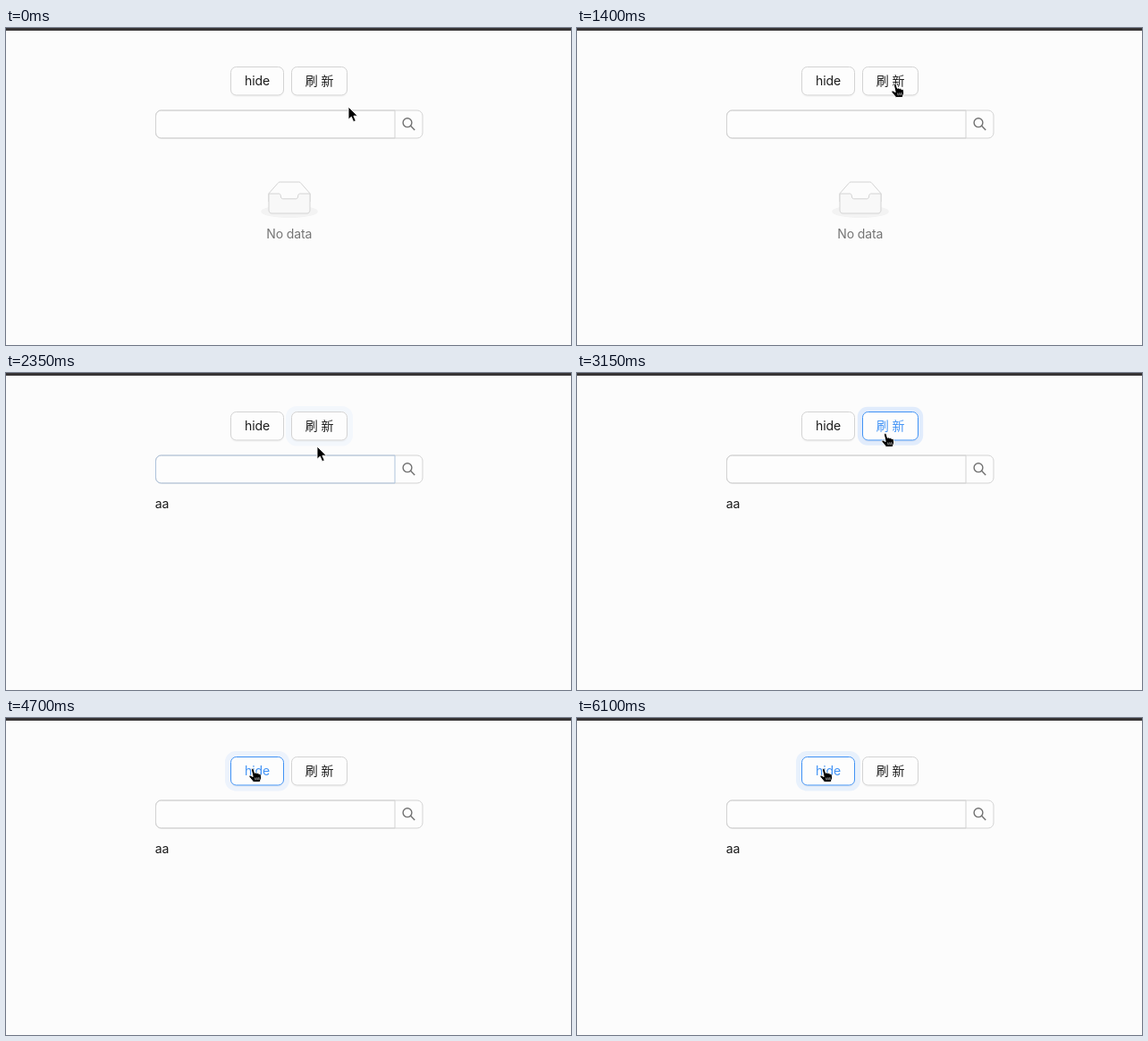
An HTML page for the animation above (6.3 s loop, 632x354 px).

```html
<!DOCTYPE html>
<html lang="en">
<head>
<meta charset="utf-8">
<title>Hide and refresh</title>
<style>
  html, body { margin: 0; width: 100%; height: 100%; overflow: hidden; background: #fcfcfc; }
  svg { display: block; width: 632px; height: 354px; }
  text { font: 14px Inter, "Noto Sans CJK SC", "Noto Sans CJK", sans-serif; letter-spacing: -.12px; fill: #1c1c1c; }
  .box { fill: #fdfdfd; stroke: #d3d3d3; }
  .shade { fill: #000; opacity: .025; }
  .wave { fill: none; stroke: #1677ff; }
  .line { fill: none; stroke: #d3d3d3; }
</style>
</head>
<body>
<svg viewBox="0 0 632 354">
  <rect width="632" height="354" fill="#fcfcfc"/>
  <rect width="632" height="3" fill="#373435"/>

  <g id="hide">
    <rect class="wave"/>
    <rect class="shade" x="251" y="45" width="60" height="32" rx="6"/>
    <rect class="box" x="251.5" y="43.5" width="59" height="31.5" rx="6"/>
    <text x="281" y="64" text-anchor="middle">hide</text>
  </g>
  <g id="refresh">
    <rect class="wave"/>
    <rect class="shade" x="319" y="45" width="63" height="32" rx="6"/>
    <rect class="box" x="319.5" y="43.5" width="62" height="31.5" rx="6"/>
    <text x="350.5" y="64" text-anchor="middle">刷 新</text>
  </g>

  <g id="panel">
    <rect class="box" x="167.5" y="92" width="298.5" height="31" rx="6"/>
    <path id="field" class="line" d="M435 92H173.500a6 6 0 0 0-6 6v19a6 6 0 0 0 6 6H435z"/>
    <g fill="none" stroke="#707070" stroke-width="1.4">
      <circle cx="449" cy="105.700" r="4.900"/>
      <path d="M452.600 109.300L457.200 113.900"/>
    </g>
    <g id="empty">
      <g transform="translate(285 172)">
        <ellipse cx="32" cy="33" rx="32" ry="7" fill="#f3f3f3"/>
        <path class="line" style="fill:#fcfcfc" d="M55 12.760L44.850 1.260C44.370.47 43.660 0 42.910 0H21.090c-.75 0-1.460.47-1.950 1.260L9 12.760V22h46z"/>
        <path class="line" style="fill:#f8f8f8" d="M41.600 15.900c0-1.600 1-2.900 2.200-2.900H55v18.100c0 2.100-1.300 3.900-2.950 3.900h-40.100C10.300 35 9 33.250 9 31.100V13h11.200c1.200 0 2.200 1.300 2.200 2.900s1 2.900 2.200 2.900h14.800c1.200 0 2.200-1.300 2.200-2.900z"/>
      </g>
      <text x="316.700" y="235" text-anchor="middle" style="fill:#757575">No data</text>
    </g>
    <text id="item" x="166.700" y="151">aa</text>
  </g>

  <g id="cursor">
    <path id="arrow" d="M0 0V14.200L3.300 11.200L5.700 16.700L8.300 15.600L5.900 10.200H10.400Z" fill="#000" stroke="#fff" stroke-width=".9"/>
    <g id="hand" stroke="#fff" stroke-width=".9" stroke-linejoin="round">
      <path d="M-1.500 1C-1.800-.6.600-1 1.100.5L2.300 4.400C3.200 3.600 4.400 4 4.700 4.900C5.600 4.300 6.700 4.700 7 5.600C8.200 5.100 9.200 5.800 9.300 7L9.600 10L8 14.500H.8L-3.900 8.800C-4.700 7.500-3.200 6.400-2 7.400L.2 8.600Z"/>
      <path d="M2.700 9.600L3.200 12.400M4.800 9.400L5.200 12.200M6.900 9.200L7 12" fill="none" stroke-width=".7"/>
    </g>
  </g>
</svg>
<script>
const LOOP = 6300, STEP = 50, FADE = 200, WAVE = 2000;
const $ = id => document.getElementById(id);
const clamp = v => Math.min(1, Math.max(0, v));
const easeOutCirc = p => Math.sqrt(1 - (1 - p) ** 2);
const within = (t, spans) => spans.some(([a, b]) => t >= a && t < b);

// time, x, y of the pointer tip
const path = [
  [0, 383, 88], [650, 370, 87], [1100, 356, 82], [1300, 357, 80],
  [1400, 356, 63], [1900, 356, 63], [2000, 353, 78], [2150, 350, 132],
  [2250, 349, 112], [2350, 348, 82], [2650, 344, 83], [2800, 277, 81],
  [2880, 300, 81], [2950, 345, 68], [3300, 345, 68], [3400, 316, 72],
  [3600, 276, 57], [LOOP, 276, 57]
];
const handSpans = [[1400, 1950], [2950, 3350], [3450, LOOP]];
const hiddenSpans = [[3950, 4200], [4750, 5050], [5350, 5750]];
const buttons = [
  { id: "hide", x: 251, w: 60, hover: [[3450, LOOP]], clicks: [3910, 4150, 4710, 5000, 5310, 5720] },
  { id: "refresh", x: 319, w: 63, hover: [[1400, 1950], [2920, 3350]], clicks: [1500, 2950] }
];
const fieldHover = [[2030, 2120], [2200, 2300]];
const loadedAt = 1750;

function pointAt(t) {
  const i = path.findIndex(k => k[0] > t);
  const [a, b] = [path[i - 1], path[i]];
  const p = (t - a[0]) / (b[0] - a[0]);
  return [1, 2].map(n => a[n] + (b[n] - a[n]) * p);
}

// 0 to 1: fades in at a span's start and out after its end
function glow(t, spans) {
  return Math.max(...spans.map(([a, b]) =>
    Math.min(clamp((t - a) / FADE), clamp((b - a) / FADE) - clamp((t - b) / FADE))), 0);
}

function mix(from, to, p) {
  return `rgb(${from.map((v, i) => Math.round(v + (to[i] - v) * p))})`;
}
const grey = [211, 211, 211], ink = [28, 28, 28], blue = [64, 146, 245];

function drawWave(el, b, t) {
  const start = Math.max(...b.clicks.filter(c => c <= t), -WAVE);
  const age = t - start;
  const s = 6 * easeOutCirc(clamp(age / 400));
  const attrs = {
    x: b.x - s / 2, y: 43 - s / 2, width: b.w + s, height: 32.5 + s,
    rx: 6 + s / 2, "stroke-width": s,
    opacity: 0.2 * (1 - easeOutCirc(clamp(age / WAVE)))
  };
  for (const name in attrs) el.setAttribute(name, attrs[name]);
}

function show(id, on) {
  $(id).style.display = on ? "" : "none";
}

function render(t) {
  for (const b of buttons) {
    const g = $(b.id), p = glow(t, b.hover);
    g.querySelector(".box").style.stroke = mix(grey, blue, p);
    g.querySelector("text").style.fill = mix(ink, blue, p);
    drawWave(g.querySelector(".wave"), b, t);
  }
  $("field").style.stroke = mix(grey, blue, glow(t, fieldHover));
  show("panel", !within(t, hiddenSpans));
  show("empty", t < loadedAt);
  show("item", t >= loadedAt);

  const hand = within(t, handSpans);
  show("hand", hand);
  show("arrow", !hand);
  $("cursor").setAttribute("transform", `translate(${pointAt(t)})`);
}

const begin = performance.now();
function tick() {
  const t = (performance.now() - begin) % LOOP;
  render(Math.floor(t / STEP) * STEP);
  requestAnimationFrame(tick);
}
tick();
</script>
</body>
</html>
```
